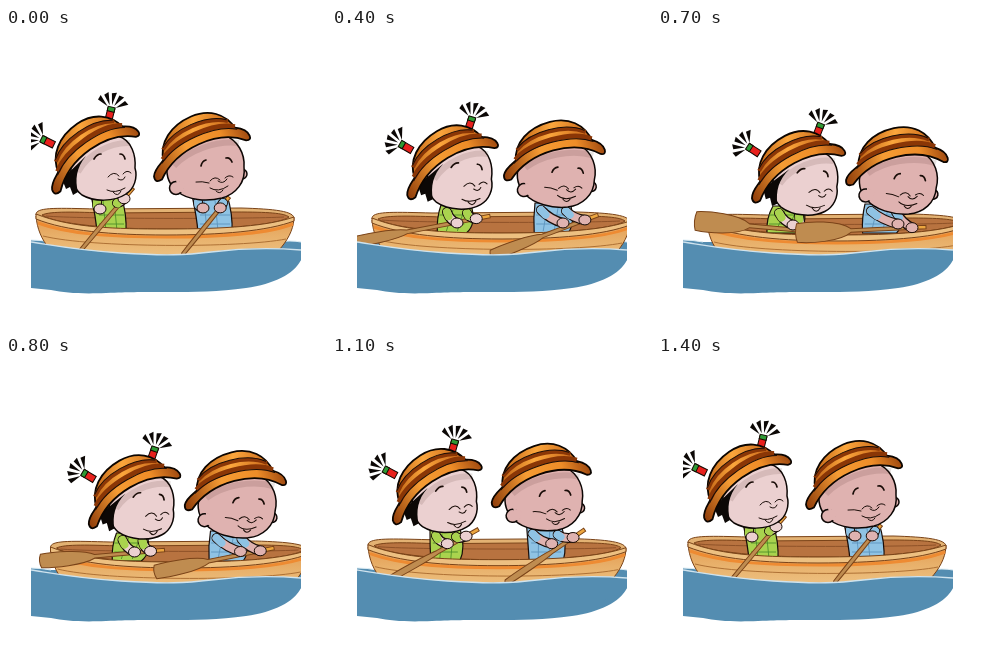
An HTML page for the animation above (1500 ms loop, 320 by 300 pixels).

```html
<!DOCTYPE html>
<html lang="en">
<head>
<meta charset="utf-8">
<title>Rowing</title>
<style>
  html, body { margin: 0; width: 100%; height: 100%; overflow: hidden; background: #fff; }
  svg { display: block; width: 320px; height: 300px; }
  .ink { fill: none; stroke: #1a0d08; stroke-width: 1; stroke-linecap: round; }
  .brow { stroke-width: 1.7; }
  .skin { stroke: #0c0604; stroke-width: 1.5; }
  .wood { stroke: #7a4318; stroke-width: 1; }
  .grain { fill: none; stroke: #a8692e; stroke-width: .9; }
  .shade { fill: none; stroke: #3a1c14; stroke-width: 6; opacity: .12; }
  .limb { fill: none; stroke-linecap: round; stroke-linejoin: round; }
  .girl { --skin: #ebd0d0; --cloth: #a9d34e; }
  .boy { --skin: #dfb2b0; --cloth: #8fc3e4; }
  .skin, .hand { fill: var(--skin); }
  .hand { stroke: #1a0d08; }
  .body { fill: var(--cloth); stroke: #1a0d08; stroke-width: 1.2; }
  .arm { stroke: var(--skin); stroke-width: 7.5; }
  .edge { stroke: #1a0d08; stroke-width: 10; }
  .sleeve { stroke: var(--cloth); stroke-width: 8; }
</style>
</head>
<body>
<svg viewBox="0 0 320 300">
  <defs>
    <clipPath id="view"><path d="M25 60H295V270H25Z"/></clipPath>
    <linearGradient id="dome" x1="0" y1=".3" x2="1" y2=".5">
      <stop offset="0" stop-color="#b4550d"/>
      <stop offset=".5" stop-color="#fba63c"/>
      <stop offset="1" stop-color="#c9681a"/>
    </linearGradient>
    <linearGradient id="brim">
      <stop offset="0" stop-color="#8f3d0a"/>
      <stop offset=".4" stop-color="#f59c34"/>
      <stop offset=".75" stop-color="#ee8d28"/>
      <stop offset="1" stop-color="#a04a10"/>
    </linearGradient>
    <linearGradient id="plank" x1="0" y1="0" x2="0" y2="1">
      <stop offset="0" stop-color="#e39a50"/>
      <stop offset=".5" stop-color="#e8b06a"/>
      <stop offset="1" stop-color="#edc080"/>
    </linearGradient>
    <linearGradient id="oar">
      <stop offset=".1" stop-color="#eca63f"/>
      <stop offset=".2" stop-color="#bf8c50"/>
    </linearGradient>
    <g id="hat">
      <g stroke="#0c0500" stroke-width="1.8" stroke-linejoin="round">
        <path d="M-37-11C-34-30-16-41 6-41C25-41 39-30 42-12Q2-30-37-11Z" fill="url(#dome)"/>
        <path d="M-52-1C-49-7-43-9-37-12C-18-26 24-27 42-13C47-10 52-6 52 0Q52 5 47 3C25-18-20-18-46 5Q-54 6-52-1Z" fill="url(#brim)"/>
      </g>
      <g fill="none" stroke="#8a3606">
        <path d="M-37-13C-18-26 24-27 42-14" stroke-width="5"/>
        <path d="M-33-22C-15-35 20-35 38-22" stroke-width="3.8"/>
      </g>
      <path class="ink" d="M-39-10C-18-24 24-24 43-11M-32-24C-15-37 20-37 37-24"/>
    </g>
    <g id="tuft">
      <path d="M-3.5-2H3.5V11H-3.5Z" fill="#e8201c" stroke="#120800"/>
      <path d="M-3.5-3H3.5V1.5H-3.5Z" fill="#2f9a35" stroke="#120800"/>
      <g id="spikes"></g>
    </g>
  </defs>

  <g clip-path="url(#view)">
    <path d="M25 212Q35 212 45 214H270Q285 212 295 214V232C288 246 268 256 240 260S190 264 160 264S125 264 100 265S60 265 45 262L25 260Z" fill="#548db1"/>
    <path d="M25 212Q35 212 45 214M270 214Q285 212 295 214" fill="none" stroke="#dcecf4" stroke-width="1.2"/>

    <g class="boat">
      <path class="wood" d="M30 187C29 179 50 180 90 181L235 180C268 181 289 183 288 191C270 206 60 208 30 187Z" fill="#e3b273"/>
      <path class="wood" d="M36 187C44 183 70 184 100 185L230 184C262 184 278 185 283 189C262 205 64 206 36 187Z" fill="#b87340"/>
      <path d="M40 188C70 191 245 191 278 189" fill="none" stroke="#8f5228"/>
    </g>

    <g class="girl"><path class="body"/><path class="plaid" fill="none" stroke="#4f8f2a" stroke-width=".9"/></g>
    <g class="boy"><path class="body"/><path class="plaid" fill="none" stroke="#5c93bd" stroke-width=".9"/></g>

    <g class="boat">
      <path class="wood" d="M30 188C31 201 36 212 43 220C90 230 220 230 273 222C281 213 287 203 288 191C265 208 70 210 30 188Z" fill="url(#plank)"/>
      <path d="M32 195C62 206 105 209 160 209C215 209 262 206 287 196" fill="none" stroke="#ee8b32" stroke-width="3"/>
      <path class="grain" d="M37 208C85 220 235 220 280 211"/>
      <path class="wood" d="M30 186C65 200 110 201 160 201C220 201 262 198 288 189V193C262 203 215 207 160 207C105 207 60 203 30 191Z" fill="#edc081"/>
    </g>

    <g class="girl">
      <path class="oar wood" fill="url(#oar)"/>
      <g class="arms"></g>
      <g class="head">
        <use href="#tuft" transform="translate(105 82) rotate(14)"/>
        <use href="#tuft" transform="translate(38 112) rotate(-64)"/>
        <path class="skin" d="M65 140C66 118 90 106 112 108C126 112 130 128 129 140C132 150 128 161 120 166C108 174 88 174 76 167C67 160 64 150 65 140Z"/>
        <path class="shade" d="M72 144C82 126 104 114 124 115"/>
        <path d="M56 151L80 128C70 140 69 152 72 164L67 167L64 159L60 161Z" fill="#0c0806"/>
        <path class="ink brow" d="M88 131Q91 126 95 126M114 126Q118 126 119 131"/>
        <path class="ink" d="M102 149Q108 142 113 148M117 146Q121 141 125 145M112 151Q117 154 119 149M101 162Q109 166 119 160M107 164Q112 170 115 163"/>
        <use href="#hat" transform="translate(89.500 133) rotate(-34.600)"/>
      </g>
    </g>

    <g class="boy">
      <path class="oar wood" fill="url(#oar)"/>
      <g class="arms"></g>
      <g class="head">
        <circle class="skin" cx="236" cy="146" r="5"/>
        <path class="skin" d="M161 138C166 116 190 104 218 107C232 112 239 126 238 139C240 154 230 166 216 170C200 174 182 172 172 164C163 157 160 148 161 138Z"/>
        <circle class="skin" cx="170" cy="160" r="6.500"/>
        <path d="M170 152L179 155L177 165L172 163Z" fill="#dfb2b0"/>
        <path class="shade" d="M168 138C182 123 210 112 233 115"/>
        <path class="ink brow" d="M195 138Q196 133 200 132M220 130Q224 129 226 134"/>
        <path class="ink" d="M190 154Q196 153 203 155M204 153Q209 147 214 152M219 150Q223 146 227 149M212 153Q217 157 221 151M204 160Q212 165 222 158M210 163Q214 167 217 162"/>
        <use href="#hat" transform="translate(196 128.500) rotate(-23.700)"/>
      </g>
    </g>

    <path d="M25 214C45 217 70 222 115 225S180 227 205 224S255 219 295 222V232L270 246H25Z" fill="#548db1"/>
    <path d="M25 214C45 217 70 222 115 225S180 227 205 224S255 219 295 222" fill="none" stroke="#cfe3ee" stroke-width="1.3"/>
  </g>
</svg>

<script>
const STEP = 100, STEPS = 15;
const times = [0, 2, 4, 7, 9, 12, 14, 15];
const all = s => document.querySelectorAll(s);

// Each row holds one value per key; the stroke ends where it began.
const boat = { x: [0, 5, 10, 19, 10, 4], y: [0, 2, 4, 6, 4, 2], blade: [2, 3.5, 6, 11, 5, 2.5] };
const kids = {
  girl: {
    pivot: [89.5, 133], width: 31,
    dx: [0, 15.5, 31, 51, 27, 10], dy: [0, 5, 8.5, 14, 6.5, 3], turn: [0, 2, 4, 7, 3, 1.5],
    sx: [88, 99, 112, 118, 109, 97], sy: [172, 178, 182, 183, 181, 176],
    nx: [94, 114, 125, 135, 122, 112], ny: [181, 187, 195, 197, 195, 184],
    hx: [127, 147, 158, 160, 157, 141], hy: [160, 171, 188, 204, 184, 168],
    tx: [75, 57, 22, 38, 32, 72], ty: [222, 219, 214, 193, 217, 225]
  },
  boy: {
    pivot: [196, 128.5], width: 36,
    dx: [0, 14, 26.5, 43, 24, 8], dy: [0, 2.5, 6.5, 13, 5, 1], turn: [0, 6.5, 9, 11, 8.5, 3.5],
    sx: [189, 197, 206, 210, 205, 194], sy: [172, 175, 180, 181, 179, 174],
    nx: [197, 219, 231, 240, 229, 215], ny: [180, 186, 195, 196, 195, 184],
    hx: [223, 248, 266, 268, 268, 245], hy: [169, 171, 187, 199, 185, 168],
    tx: [177, 175, 160, 139, 160, 182], ty: [226, 226, 227, 205, 227, 226]
  }
};

document.getElementById('spikes').innerHTML = [-56, -29, -2, 25, 52].map(a =>
  `<path transform="rotate(${a})" d="M0-5L-2.600-16.500L2.300-18Z" fill="#0c0806"/>`).join('');

function at(row, n) {
  let i = 0;
  while (n >= times[i + 1]) i++;
  const a = row[i % 6], b = i < 5 ? row[i + 1] : row[0];
  return i > 5 ? row[0] : a + (b - a) * (n - times[i]) / (times[i + 1] - times[i]);
}

function oarPath(len, w) {
  const neck = len - 54;
  return `M0-1.800H${neck}C${neck + 12} ${-w},${len - 12} ${-w},${len} ${-w * .85}` +
    `Q${len + 3} 0 ${len} ${w * .85}C${len - 12} ${w},${neck + 12} ${w},${neck} 1.800H0Z`;
}

function limb(x, y, hx, hy) {
  const mx = (x + hx) / 2 - 2, my = (y + hy) / 2 + 3;
  const d = `M${x} ${y}Q${mx} ${my} ${hx} ${hy}`;
  return `<path class="limb edge" d="${d}"/><path class="limb arm" d="${d}"/>` +
    `<path class="limb sleeve" d="M${x} ${y}L${(x + mx) / 2} ${(y + my) / 2}"/>` +
    `<ellipse class="hand" cx="${hx}" cy="${hy}" rx="6" ry="5"/>`;
}

function drawKid(name, n) {
  const k = kids[name], v = key => at(k[key], n);
  const part = c => document.querySelector(`.${name} .${c}`);
  const sx = v('sx'), sy = v('sy'), hx = v('hx'), hy = v('hy');
  const ox = v('tx') - hx, oy = v('ty') - hy, len = Math.hypot(ox, oy);
  const base = sx * .6 + k.sx[0] * .4 + 3, right = sx + k.width;

  part('head').setAttribute('transform',
    `translate(${v('dx')} ${v('dy')}) rotate(${v('turn')} ${k.pivot})`);
  part('body').setAttribute('d',
    `M${sx - 3} ${sy - 5}H${right - 4}Q${right + 2} ${sy + 14} ${base + k.width - 2} 205H${base}Q${base - 1} 190 ${sx - 3} ${sy - 5}Z`);
  part('plaid').setAttribute('d',
    `M${sx + 9} ${sy}L${base + 9} 203M${sx + 20} ${sy}L${base + 20} 203` +
    `M${base + 2} 187H${base + k.width - 4}M${base + 2} 196H${base + k.width - 4}`);

  const oar = part('oar');
  oar.setAttribute('d', oarPath(len, at(boat.blade, n)));
  oar.setAttribute('transform', `translate(${hx} ${hy}) rotate(${Math.atan2(oy, ox) * 180 / Math.PI})`);
  part('arms').innerHTML =
    limb(right - 8, sy + 3, hx + ox / len * 14, hy + oy / len * 14) +
    limb(sx + 3, sy + 2, v('nx'), v('ny'));
}

let shown = -1;
function draw() {
  const n = Math.floor(performance.now() / STEP) % STEPS;
  if (n !== shown) {
    shown = n;
    all('.boat').forEach(b => b.setAttribute('transform', `translate(${at(boat.x, n)} ${at(boat.y, n)})`));
    drawKid('girl', n);
    drawKid('boy', n);
  }
  requestAnimationFrame(draw);
}
draw();
</script>
</body>
</html>
```
